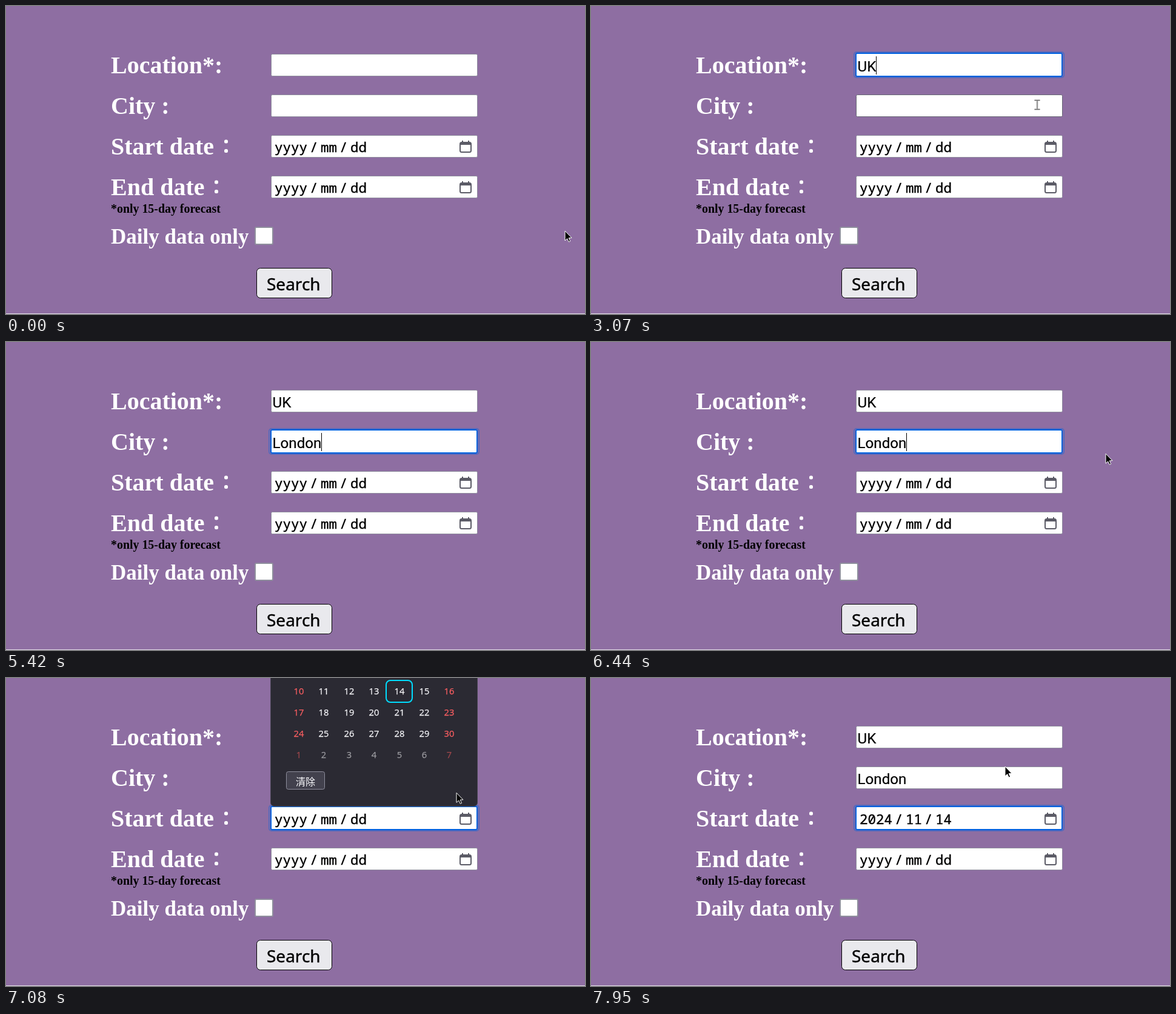
Recreate the animation shown at these times as an HTML page with a canvas. Size 955x508 px, loop 8000 ms.

```html
<!DOCTYPE html>
<html lang="en">
<head>
<meta charset="utf-8">
<title>Forecast search form</title>
<style>
html, body { margin: 0; height: 100%; overflow: hidden; background: #8e6ea2; }
canvas { display: block; width: 955px; height: 508px; }
</style>
</head>
<body>
<canvas id="stage"></canvas>
<script>
const W = 955, H = 508, LOOP = 8000;
const canvas = document.getElementById('stage');
const scale = window.devicePixelRatio || 1;
canvas.width = W * scale;
canvas.height = H * scale;
const ctx = canvas.getContext('2d');

const SERIF = '"Liberation Serif", "Times New Roman", serif';
const INPUT_FONT = '24.2px Roboto, sans-serif';
const MONO = '22.5px "Noto Sans Mono", monospace';
const FIELD = { x: 437, w: 341, h: 37, top: 79, step: 67 };

const MOUSE_STEP = 120, KEY_STEP = 260, BLINK = 515;
const CALENDAR_OPEN = 7080, CALENDAR_CLOSE = 7830;
const entries = [{ word: 'UK', start: 1810 }, { word: 'London', start: 4110 }];
const focusTimes = [760, 3230, 6950];
const home = { x: 922, y: 371 };
const moves = [
  { start: 150, steps: 6, x: 724, y: 100 },
  { start: 880, steps: 2, x: 836, y: 147 },
  { start: 2950, steps: 2, x: 736, y: 163 },
  { start: 3230, steps: 3, x: 877, y: 169 },
  { start: 6440, steps: 4, x: 765, y: 230 },
  { start: CALENDAR_OPEN, steps: 5, x: 655, y: 27 },
  { start: CALENDAR_CLOSE, steps: 2, x: 683, y: 146 }
];

const rowTop = row => FIELD.top + row * FIELD.step;

// The pointer advances in discrete steps and hides while the user types.
function pointerAt(t) {
  const index = moves.findLastIndex(move => move.start <= t);
  if (index < 0) return home;
  const move = moves[index], from = moves[index - 1] || home;
  if (entries.some(({ start }) => start > move.start && start <= t)) return null;
  const p = Math.min(1, (Math.floor((t - move.start) / MOUSE_STEP) + 1) / move.steps);
  return { x: from.x + (move.x - from.x) * p, y: from.y + (move.y - from.y) * p };
}

function typed({ word, start }, t) {
  return word.slice(0, Math.max(0, Math.floor((t - start) / KEY_STEP) + 1));
}

// A thin stroke of the same colour gives the heavier interface text.
function text(str, x, y, font, color, { align = 'left', weight = 0 } = {}) {
  ctx.font = font;
  ctx.fillStyle = ctx.strokeStyle = color;
  ctx.textAlign = align;
  ctx.fillText(str, x, y);
  if (weight) {
    ctx.lineWidth = weight;
    ctx.strokeText(str, x, y);
  }
}

function box(x, y, w, h, r, fill, stroke, lineWidth = 1) {
  ctx.beginPath();
  ctx.roundRect(x, y, w, h, r);
  if (fill) { ctx.fillStyle = fill; ctx.fill(); }
  if (stroke) { ctx.strokeStyle = stroke; ctx.lineWidth = lineWidth; ctx.stroke(); }
}

function wideColon(x, y) {
  for (const dy of [0, 15.5]) box(x - 3, y + dy - 3, 6, 6, 2.5, '#fff');
}

function drawLabels() {
  ['Location*:', 'City :', 'Start date', 'End date'].forEach((label, row) =>
    text(label, 173, rowTop(row) + 32, 'bold 40px ' + SERIF, '#fff'));
  wideColon(363, 223.5);
  wideColon(347, 290.5);
  text('*only 15-day forecast', 173, 341, 'bold 19.9px ' + SERIF, '#000');
  text('Daily data only', 173, 392, 'bold 35px ' + SERIF, '#fff');
  box(411, 365, 29, 28, 2, '#fff', '#8f8f9d', 2);
  box(413.5, 432.5, 124, 49, 6, '#e9e9ed', '#000');
  text('Search', 430, 469, '28px "Noto Sans", sans-serif', '#000', { weight: .4 });
}

function drawField(row, focused, hovered) {
  const { x, w, h } = FIELD, y = rowTop(row);
  if (focused) {
    box(x - 3, y - 3, w + 5, h + 5, 4, null, 'rgba(0,97,224,.4)', 2);
    box(x, y - 1, w - 1, h + 1, 2, '#fff', '#0061e0', 2);
  } else {
    box(x + .5, y + .5, w - 1, h - 1, 2, '#fff', hovered ? '#676774' : '#8f8f9d');
  }
}

function drawEntry(row, value, showCaret) {
  const y = rowTop(row);
  text(value, 439.5, y + 29, INPUT_FONT, '#000', { weight: .2 });
  if (showCaret) ctx.fillRect(Math.round(439.4 + ctx.measureText(value).width), y + 4, 1, 30);
}

function drawDate(row, date, hovered) {
  const y = rowTop(row), advance = 13.5, gap = 22;
  let x = 443;
  date.split('/').forEach((part, i) => {
    if (i) {
      text('/', x + 4, y + 27.5, MONO, '#000', { weight: .4 });
      x += gap;
    }
    text(part, x, y + 27.5, MONO, '#000', { weight: .4 });
    x += part.length * advance;
  });
  const color = hovered ? '#000' : '#5b5b66';
  box(749, y + 12, 18, 16, 2.5, null, color, 2);
  ctx.fillStyle = color;
  ctx.fillRect(749, y + 12, 18, hovered ? 5 : 4);
  for (const dx of [3, 13]) ctx.fillRect(749 + dx, y + 9, 2, 3);
}

function drawCalendar(mouse) {
  const left = 483, top = 22, stepX = 41.4, stepY = 35;
  const hoverCol = Math.round((mouse.x - left) / stepX);
  const hoverRow = Math.round((mouse.y - top) / stepY);
  box(436.5, -10, 341, 221.5, 6, '#2b2a33', '#45444f');
  for (let i = 0; i < 28; i++) {
    const col = i % 7, row = Math.floor(i / 7);
    const x = Math.round(left + col * stepX), y = top + row * stepY;
    const day = 10 + i, nextMonth = day > 30;
    if (day === 14) box(x - 22, y - 18, 43, 36, 7, null, '#00ddff', 2);
    if (row === hoverRow && col === hoverCol) box(x - 18.5, y - 14.5, 36, 29, 3, '#6b6b70', '#b5b5ba');
    ctx.globalAlpha = nextMonth ? .5 : 1;
    text(nextMonth ? day - 30 : day, x, y + 5, '14.7px "Open Sans", sans-serif',
      col % 6 ? '#fbfbfe' : '#ff5f62', { align: 'center', weight: .25 });
    ctx.globalAlpha = 1;
  }
  box(462.5, 154.5, 63, 29, 3, '#42414d', '#8f8f9d');
  text('清除', 494, 177, '16px "Noto Sans CJK TC", "Noto Sans CJK", sans-serif', '#fbfbfe',
    { align: 'center' });
}

function drawPointer({ x, y }, isBeam) {
  ctx.save();
  ctx.translate(x, y);
  if (isBeam) {
    const beam = new Path2D('M-4.5 -7.5H4.5M-4.5 7.5H4.5M0 -7.5V7.5');
    for (const [color, width] of [['#ccc', 3], ['#666', 1]]) {
      ctx.strokeStyle = color;
      ctx.lineWidth = width;
      ctx.stroke(beam);
    }
  } else {
    const arrow = new Path2D('M0 0V16L3.7 12.6L6.2 18L8.6 17L6.2 11.6L11 11.4Z');
    ctx.fillStyle = '#000';
    ctx.fill(arrow);
    ctx.strokeStyle = '#fff';
    ctx.lineWidth = 1;
    ctx.stroke(arrow);
  }
  ctx.restore();
}

function draw(t) {
  const mouse = pointerAt(t);
  const active = focusTimes.findLastIndex(time => time <= t);
  const caretOn = Math.floor((t - focusTimes[active]) / BLINK) % 2 === 0;
  const calendarOpen = t >= CALENDAR_OPEN && t < CALENDAR_CLOSE;
  const isOver = row => mouse && !calendarOpen &&
    mouse.x > FIELD.x && mouse.x < FIELD.x + FIELD.w &&
    mouse.y > rowTop(row) + 1 && mouse.y < rowTop(row) + FIELD.h;

  ctx.setTransform(scale, 0, 0, scale, 0, 0);
  ctx.fillStyle = '#8e6ea2';
  ctx.fillRect(0, 0, W, H);
  ctx.fillStyle = '#e4dde8';
  ctx.fillRect(0, 507, W, 1);

  drawLabels();
  for (let row = 0; row < 4; row++) drawField(row, row === active, isOver(row));
  entries.forEach((entry, row) => drawEntry(row, typed(entry, t), row === active && caretOn));
  drawDate(2, t < CALENDAR_CLOSE ? 'yyyy/mm/dd' : '2024/11/14', isOver(2) && mouse.x > 746);
  drawDate(3, 'yyyy/mm/dd', false);
  if (calendarOpen) drawCalendar(mouse);
  if (mouse) drawPointer(mouse, isOver(0) || isOver(1));
}

const start = performance.now();
function tick() {
  draw((performance.now() - start) % LOOP);
  requestAnimationFrame(tick);
}
tick();
</script>
</body>
</html>
```
